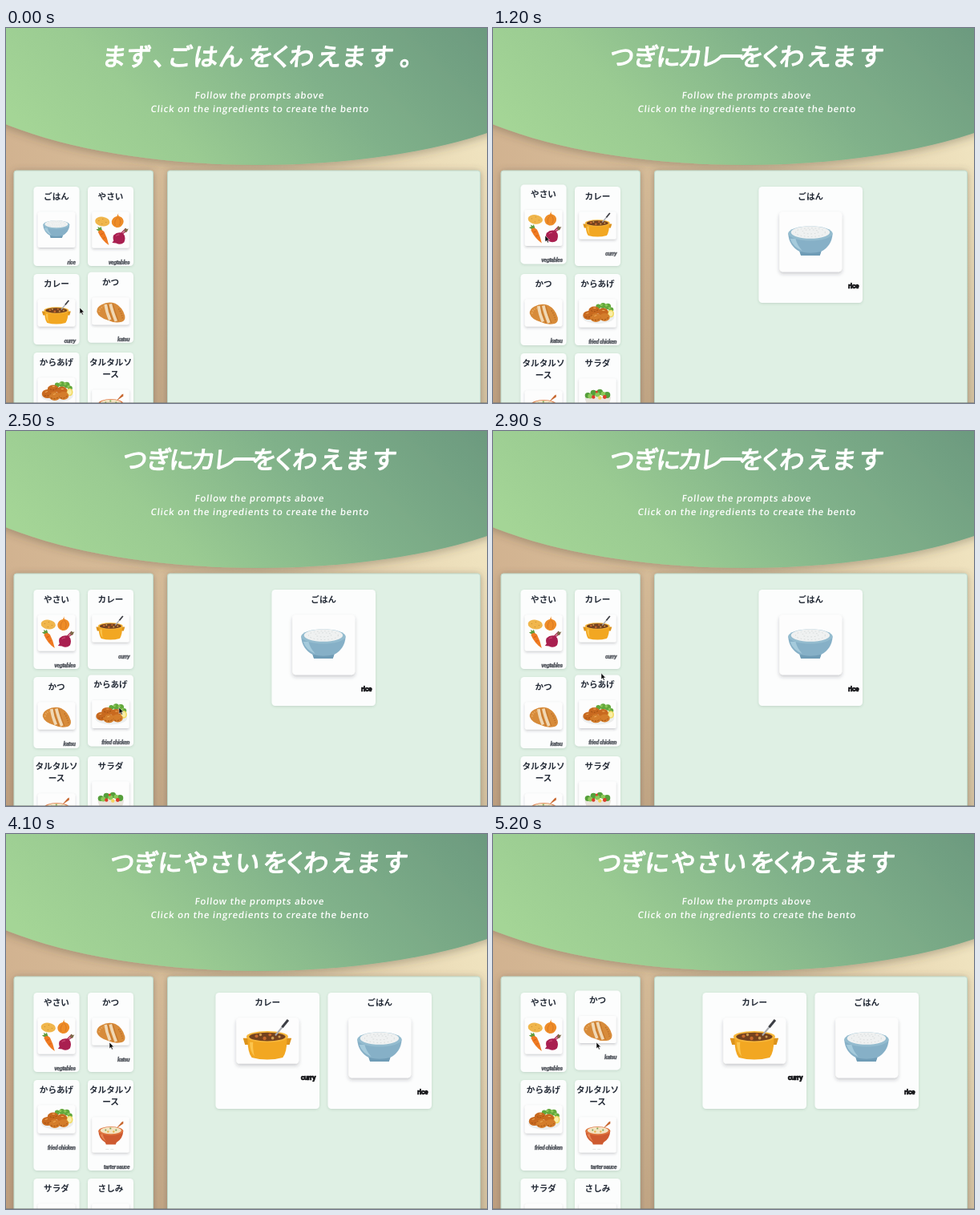
These frames come from a looping animation (600x468 px, 5.3 s). An HTML page:

```html
<!DOCTYPE html>
<html lang="ja">
<head>
<meta charset="utf-8">
<title>Bento</title>
<style>
html, body { margin: 0; width: 100%; height: 100%; overflow: hidden; background: #d8bd98; }
svg { display: block; width: 600px; height: 468px; }
.title { font: 400 31px "Noto Sans CJK JP", "Noto Sans CJK", sans-serif; fill: #fff; text-anchor: middle;
  stroke: #fff; stroke-width: 1.3px; stroke-linejoin: round; }
.hint { font: 600 11.5px "Open Sans", sans-serif; fill: #fff; text-anchor: middle; letter-spacing: .75px; }
.name { font: 700 10.6px "Noto Sans CJK JP", "Noto Sans CJK", sans-serif; fill: #252c38; text-anchor: middle; }
.tag { font: italic 900 7.2px Roboto, sans-serif; fill: #5b5f66; stroke: #5b5f66; stroke-width: .3px;
  text-anchor: end; letter-spacing: -.5px; }
.big { font-size: 8.8px; fill: #0c0d10; stroke: #0c0d10; stroke-width: .5px; font-style: normal; }
</style>
</head>
<body>
<svg viewBox="0 0 600 468" xmlns="http://www.w3.org/2000/svg">
  <defs>
    <linearGradient id="wood" gradientUnits="userSpaceOnUse" x1="0" y1="300" x2="600" y2="130">
      <stop offset="0" stop-color="#d0b08e"/><stop offset=".5" stop-color="#dcc4a0"/><stop offset="1" stop-color="#f0e4c0"/>
    </linearGradient>
    <linearGradient id="shade" x1="0" y1="0" x2="0" y2="1">
      <stop offset=".35" stop-color="#80664e" stop-opacity="0"/><stop offset="1" stop-color="#80664e" stop-opacity=".22"/>
    </linearGradient>
    <linearGradient id="leaf" gradientUnits="userSpaceOnUse" x1="0" y1="100" x2="350" y2="-250">
      <stop offset="0" stop-color="#a4d596"/><stop offset=".25" stop-color="#9acb92"/>
      <stop offset=".6" stop-color="#80b18a"/><stop offset="1" stop-color="#6c9a7f"/>
    </linearGradient>
    <filter id="deep" x="-20%" y="-20%" width="140%" height="140%">
      <feDropShadow dx="0" dy="3" stdDeviation="6" flood-color="#4a4232" flood-opacity=".36"/>
    </filter>
    <filter id="edge" x="-10%" y="-10%" width="120%" height="120%">
      <feDropShadow dx="0" dy="1" stdDeviation="4.5" flood-color="#5a5046" flood-opacity=".42"/>
    </filter>
    <filter id="soft" x="-20%" y="-20%" width="140%" height="140%">
      <feDropShadow dx="0" dy="1" stdDeviation="1.5" flood-color="#35584a" flood-opacity=".18"/>
    </filter>
    <filter id="pic" x="-20%" y="-20%" width="140%" height="150%">
      <feDropShadow dx="0" dy="1.5" stdDeviation="1.4" flood-color="#2a3440" flood-opacity=".25"/>
    </filter>
  </defs>
  <rect width="600" height="468" fill="url(#wood)"/>
  <rect width="600" height="468" fill="url(#shade)"/>
  <ellipse cx="315" cy="21" rx="420" ry="150" fill="url(#leaf)" filter="url(#deep)"/>
  <g class="hint">
    <text transform="translate(316 88) skewX(-6)">Follow the prompts above</text>
    <text transform="translate(316.5 105) skewX(-6)">Click on the ingredients to create the bento</text>
  </g>
  <g fill="#dff0e4" stroke="#bfd9cb" filter="url(#edge)">
    <rect x="10" y="178" width="173.5" height="300" rx="3"/>
    <rect x="201.5" y="178" width="390" height="300" rx="3"/>
  </g>
  <g id="app"></g>
  <rect y="467" width="600" height="1" fill="#6f7470" opacity=".55"/>
  <path id="cursor" d="M0 0V7.8L1.8 6.2 3.1 9 4.4 8.4 3.1 5.7H5.5Z" fill="#0b0b0b" stroke="#fff" stroke-width=".5"/>
</svg>
<script>
const LOOP = 5300, LIFT = 2.6, FADE = 200;

// Pictures live in a box 46 wide and h high.
const food = {
  rice: { name: ['ごはん'], tag: 'rice', h: 44.5, art: `
    <path d="M6.5 16Q7 25 15 29.5L16 32.5H30L31 29.5Q39 25 39.5 16Z" fill="#86b0c7"/>
    <path d="M15 29.5Q23 31.5 31 29.5L30 32.5H16Z" fill="#6f9cb6"/>
    <path d="M8 20Q10 26 17 29Q13 24.5 12 20Z" fill="#a5cadb"/>
    <ellipse cx="23" cy="16" rx="16.5" ry="5.4" fill="#94bccf"/>
    <ellipse cx="23" cy="15.2" rx="14.4" ry="4.6" fill="#eff1f1"/>
    <g fill="none" stroke="#d9dddd" stroke-width=".6" stroke-dasharray="1 1.6">
      <ellipse cx="23" cy="15.2" rx="11" ry="3.2"/><ellipse cx="23" cy="14.8" rx="6" ry="1.5"/></g>` },
  veg: { name: ['やさい'], tag: 'vegtables', h: 45, art: `
    <ellipse cx="13" cy="12" rx="9.2" ry="5.8" fill="#f0b64c" transform="rotate(8 13 12)"/>
    <path d="M8 11h1M13 9h1M17 13h1M12 15h1" stroke="#c68a30"/>
    <path d="M33 1.5Q32 4.500 34 5.500Q40.500 7.500 39 14Q36.500 20 30.500 19.500Q24 17.500 24.500 11.500Q26 6.500 31 5.500Z" fill="#ee8c28"/>
    <path d="M32 7Q27 11 29 17M33 7Q37 11 34 17" fill="none" stroke="#d06f20" stroke-width=".7"/>
    <path d="M10 25L5 22 8 21 7 18.500 10 20 11 18 13 24Z" fill="#5f9a3a"/>
    <path d="M7.500 25Q10.500 20.500 15 24.500Q19 32 21 41.500Q12 35.500 7.500 25Z" fill="#ef7a22"/>
    <path d="M11 28l3-1M14 33l2-1" stroke="#c75614" stroke-width=".8"/>
    <path d="M36 27L42 21M37 28L44 23" stroke="#b33a5e" stroke-width="1.5"/>
    <path d="M40 24L41.500 20 43.500 21.500 45.500 21 43 25.500Z" fill="#7c6a48"/>
    <path d="M27 29Q32 24 38.500 26.500Q43 31 40 38Q35.500 42 30 39L25 38.500 27 36Q25.500 32 27 29Z" fill="#a91f50"/>
    <path d="M30 30Q32 28 34 28.500" stroke="#d65a82" fill="none"/>` },
  curry: { name: ['カレー'], tag: 'curry', h: 34, art: `
    <path d="M5 15h5v5h-3.500zM41 15h-5v5h3.500z" fill="#dd931c"/>
    <path d="M8.500 14Q8 25 11.500 29.500Q23 32.500 34.500 29.500Q38 25 37.500 14Z" fill="#f2a722"/>
    <path d="M10 18Q10 25 13.500 28.500Q12 23 12.500 18Z" fill="#fcc54e"/>
    <ellipse cx="23" cy="14" rx="15.500" ry="4.200" fill="#f6b63a"/>
    <ellipse cx="23" cy="14" rx="13.500" ry="3.200" fill="#74421f"/>
    <g fill="#c8692c"><circle cx="15" cy="13.500" r="1.200"/><circle cx="21" cy="15.200" r="1.300"/><circle cx="25" cy="12.500" r="1.100"/></g>
    <g fill="#cf9c50"><circle cx="18" cy="12.500" r="1"/><circle cx="27" cy="15" r="1.100"/><circle cx="32" cy="14" r=".9"/></g>
    <path d="M29 13L34 7" stroke="#a9abb0" stroke-width="1.200"/><path d="M34 7L38.500 1.500" stroke="#3d3f45" stroke-width="1.800"/>` },
  katsu: { name: ['かつ'], tag: 'katsu', h: 34, art: `
    <path d="M6 18Q5.500 12 12 9Q20 4.500 29 7.500Q38 12 41 23Q42 29 37 30.500Q28 32.500 20 28.500Q8 25 6 18Z" fill="#d78b3a"/>
    <path d="M9 18Q9 13 15 11" stroke="#e8a85c" stroke-width="2" fill="none" stroke-dasharray="1.500 1.500"/>
    <path d="M33 14Q37 19 38 26" stroke="#bd7029" stroke-width="1.600" fill="none" stroke-dasharray="1.500 1.500"/>
    <path d="M17 8.500Q18 18 22.500 28M23 8Q25 17 30 29.500" stroke="#f0d8b4" stroke-width="3.600" fill="none"/>
    <path d="M19.500 8Q21 18 26 29.500M26 8Q28 17 33 29.500" stroke="#bd7029" stroke-width=".8" fill="none"/>` },
  fried: { name: ['からあげ'], tag: 'fried chicken', h: 35, art: `
    <ellipse cx="24" cy="22" rx="20" ry="8.500" fill="#eceeee"/>
    <g fill="#62a83c"><circle cx="24" cy="9" r="3"/><circle cx="30" cy="8" r="3.600"/><circle cx="36" cy="9" r="3.800"/><circle cx="40" cy="13" r="3"/></g>
    <g fill="#8cc757"><circle cx="28" cy="7" r="1.500"/><circle cx="34" cy="7.500" r="1.700"/><circle cx="38" cy="11" r="1.500"/></g>
    <ellipse cx="39.500" cy="18" rx="4.200" ry="4.800" fill="#f0da62"/><ellipse cx="39.500" cy="18" rx="2.600" ry="3.200" fill="#faeea6"/>
    <g fill="#c8691f"><ellipse cx="12" cy="20" rx="7" ry="5.500"/><ellipse cx="19" cy="14" rx="7" ry="5"/><ellipse cx="30" cy="16" rx="6.500" ry="5"/></g>
    <g fill="#d47d2b"><ellipse cx="21" cy="23" rx="7" ry="5.400"/><ellipse cx="32" cy="22.500" rx="6.400" ry="5"/></g>
    <g stroke="#96490f" fill="none" stroke-width=".9" stroke-dasharray="2 1.700"><path d="M8 22Q13 24 17 19M16 25Q22 28 27 23M28 25Q33 27 37 22M15 14Q19 17 24 13"/></g>
    <path d="M9 18l3-1M18 11l3 0M19 21l3-1M29 14l3 0" stroke="#f0ae5b"/>` },
  tartar: { name: ['タルタルソ', 'ース'], tag: 'tarter sauce', h: 44, art: `
    <path d="M30 14L37 6 39 5 39 8Z" fill="#c7672f"/>
    <path d="M8 17Q8.500 27 16.500 31.500L17.500 34H29.500L30.500 31.500Q38.500 27 39 17Z" fill="#ce5a30"/>
    <path d="M10 21Q12 27 18 30.500Q14 26 13.500 21Z" fill="#e68554"/>
    <ellipse cx="23.500" cy="17" rx="15.500" ry="5.400" fill="#df7640"/>
    <ellipse cx="23.500" cy="16.500" rx="13" ry="4.200" fill="#f3e3c2"/>
    <g fill="#7aa450"><circle cx="17" cy="16" r="1"/><circle cx="23" cy="14" r="1.100"/><circle cx="30" cy="16" r="1.100"/></g>
    <g fill="#e6b450"><circle cx="20" cy="18" r="1.300"/><circle cx="27" cy="18" r="1.200"/></g>
    <path d="M17 40h4m2 0h4" stroke="#ddd" stroke-width=".7"/>` },
  salad: { name: ['サラダ'], tag: 'salad', h: 35, art: `
    <path d="M7 23H40Q37 38 28 40H19Q10 38 7 23Z" fill="#e9e4dc"/>
    <g fill="#559f3a"><circle cx="11" cy="21" r="3.600"/><circle cx="18" cy="18" r="3.800"/><circle cx="26" cy="17" r="3.800"/><circle cx="35" cy="20.500" r="4"/></g>
    <g fill="#8cc957"><circle cx="14" cy="22" r="3"/><circle cx="23" cy="20" r="3"/><circle cx="30" cy="19" r="2.800"/></g>
    <g fill="#dc3d2a"><circle cx="18" cy="23" r="2.200"/><circle cx="32" cy="23" r="2.400"/><circle cx="22" cy="16.500" r="1.500"/></g>
    <circle cx="26" cy="24" r="2.200" fill="#f5d55b"/>` },
  sashimi: { name: ['さしみ'], tag: 'sashimi', h: 35, art: '' }
};

const tail = x => [0, 25, 51, 85, 116, 150].map(d => x + d);
const stages = [
  { at: 0, title: 'まず、ごはんをくわえます。', xs: [134, 165, 198, 216, 248, 280, ...tail(317), 506],
    menu: ['rice', 'veg', 'curry', 'katsu', 'fried', 'tartar'], tray: [] },
  { at: 1200, title: 'つぎにカレーをくわえます', xs: [160, 190, 218, 245, 272, 297, ...tail(321)],
    menu: ['veg', 'curry', 'katsu', 'fried', 'tartar', 'salad'], tray: [['rice', 331.5]] },
  { at: 4100, fresh: true, title: 'つぎにやさいをくわえます', xs: [144, 174, 204, 236, 268, 300, ...tail(335)],
    menu: ['veg', 'katsu', 'fried', 'tartar', 'salad', 'sashimi'], tray: [['curry', 261.5], ['rice', 401.5]] }
];

const extra = f => (f.name.length - 1) * 15;
const height = f => 54 + extra(f) + f.h;

function card(f, w, h, scale, tagClass) {
  const boxY = 31.5 + extra(f), boxX = (w - 46.4 * scale) / 2;
  const names = f.name.map((s, i) => `<text class="name" x="${w / 2}" y="${16 + 15 * i}">${s}</text>`).join('');
  return `<rect width="${w}" height="${h}" rx="4.5" fill="#fcfdfd" filter="url(#soft)"/>
    <g transform="translate(${boxX} ${boxY}) scale(${scale})">
      <rect width="46.4" height="${f.h}" rx="2.5" fill="#fdfdfd" filter="url(#pic)"/>${f.art}</g>
    ${names}<text class="${tagClass}" x="${w - 5}" y="${boxY + f.h * scale + 20.5}">${f.tag}</text>`;
}

function layout(menu) {
  const slots = [];
  let y = 198;
  for (let i = 0; i < menu.length; i += 2) {
    const h = Math.max(height(food[menu[i]]), height(food[menu[i + 1]]));
    slots.push({ x: 34.5, y, h }, { x: 102, y, h });
    y += h + 10;
  }
  return slots;
}

const app = document.getElementById('app');
const cursor = document.getElementById('cursor');

for (const s of stages) {
  s.slots = layout(s.menu);
  s.el = document.createElementNS('http://www.w3.org/2000/svg', 'g');
  s.el.innerHTML = `<g transform="translate(0 47) skewX(-6)"><text class="title" x="${s.xs.join(' ')}">${s.title}</text></g>`
    + s.tray.map(([k, x]) => `<g transform="translate(${x} 198)">${card(food[k], 129.5, 145, 1.68, 'tag big')}</g>`).join('')
    + s.menu.map((k, i) => `<g class="slot">${card(food[k], 57, s.slots[i].h, 1, 'tag')}</g>`).join('');
  s.cards = s.el.querySelectorAll('.slot');
  app.append(s.el);
}

// time, x, y of the pointer
const path = [[-200, 120, 355], [0, 92, 349], [600, 65, 259], [1500, 65, 259],
  [2200, 141, 345], [2600, 141, 345], [3200, 129, 260], [LOOP, 129, 260]];

function pointer(t) {
  let i = 1;
  while (i < path.length - 1 && t > path[i][0]) i++;
  const [a, x0, y0] = path[i - 1], [b, x1, y1] = path[i];
  const u = Math.min(1, Math.max(0, (t - a) / (b - a)));
  const e = (1 - Math.cos(Math.PI * u)) / 2;
  return [x0 + (x1 - x0) * e, y0 + (y1 - y0) * e];
}

// Share of the last moments the pointer spent over a card.
function lift(stage, slot, t) {
  const n = 10;
  let sum = 0;
  for (let i = 0; i < n; i++) {
    const at = t - (i + .5) * FADE / n;
    if (stage.fresh && at < stage.at) break;
    const [x, y] = pointer(at);
    if (x > slot.x && x < slot.x + 57 && y > slot.y && y < slot.y + slot.h) sum++;
  }
  const u = sum / n;
  return LIFT * u * (2 - u);
}

function draw(t) {
  const now = stages.filter(s => t >= s.at).pop();
  for (const s of stages) s.el.setAttribute('display', s === now ? 'inline' : 'none');
  now.slots.forEach((slot, i) => {
    now.cards[i].setAttribute('transform', `translate(${slot.x} ${slot.y - lift(now, slot, t)})`);
  });
  cursor.setAttribute('transform', `translate(${pointer(t).join(' ')})`);
}

const start = performance.now();
function tick() {
  draw((performance.now() - start) % LOOP);
  requestAnimationFrame(tick);
}
tick();
</script>
</body>
</html>
```
